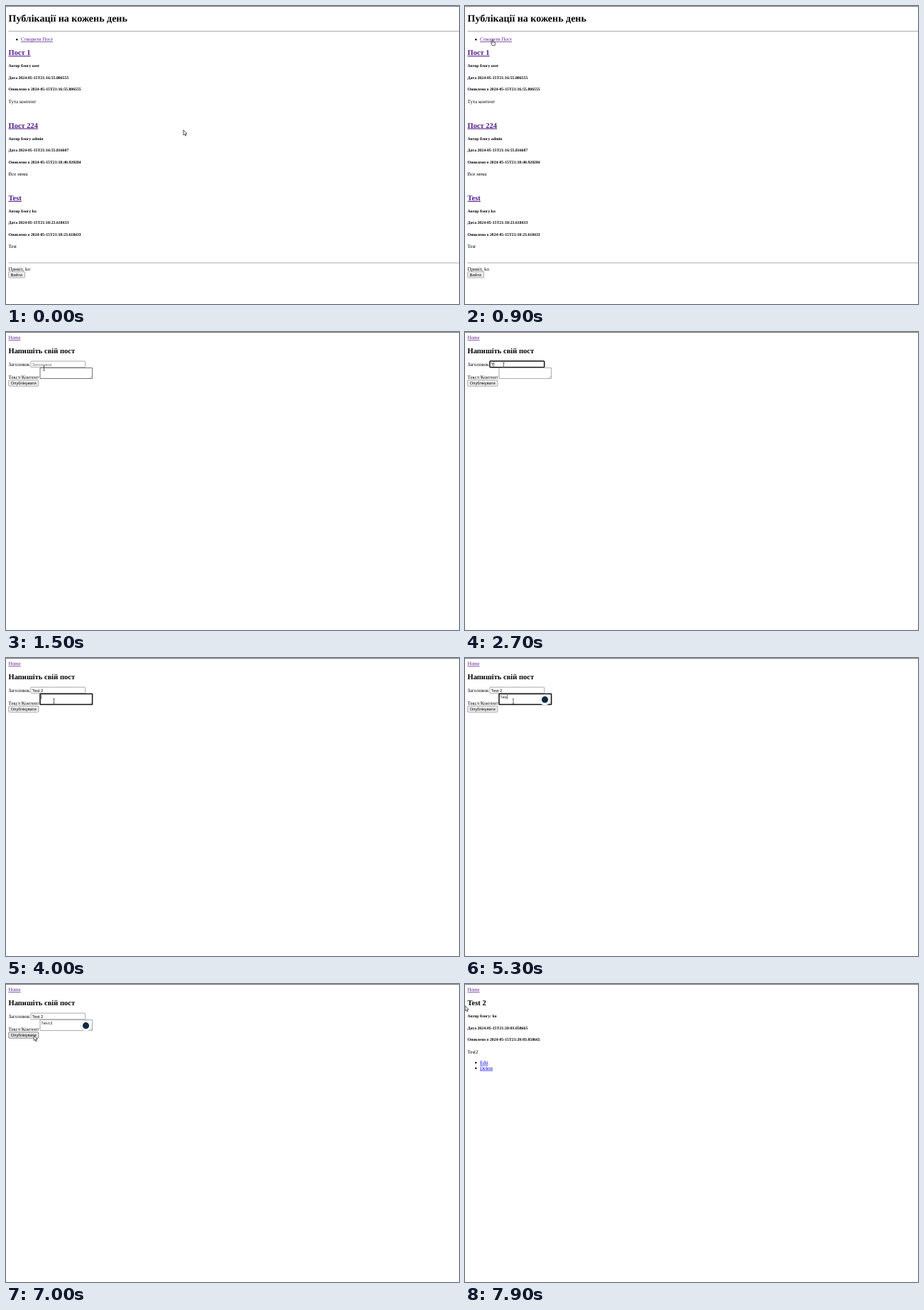
These frames come from a looping animation (638x420 px, 8000 ms). An HTML page:

```html
<!DOCTYPE html>
<html lang="uk">
<head>
<meta charset="utf-8">
<title>Blog</title>
<style>
  html, body { margin: 0; height: 100%; overflow: hidden; background: #fff; }
  svg { display: block; width: 638px; height: 420px; }
  text { font: 7px "Liberation Serif", serif; text-rendering: geometricPrecision; white-space: pre; }
  .h1 { font-size: 14px; font-weight: bold; }
  .h2 { font-size: 10.5px; font-weight: bold; }
  .h5 { font-size: 5.79px; font-weight: bold; }
  .ui { font: 5.83px "Liberation Sans", sans-serif; }
  .mono { font: 5.4px "Liberation Mono", monospace; }
  .link { text-decoration: underline; fill: #0000ee; }
  .visited { fill: #551a8b; }
  .hint { fill: #757575; }
  .box { fill: #fff; stroke: #858585; stroke-width: .7; }
  .box.hover { stroke: #333; }
  .box.focus { stroke: #101010; stroke-width: 1.5; }
  .button { fill: #efefef; stroke: #767676; stroke-width: .6; }
  .button.hover { fill: #e5e5e5; stroke: #4f4f4f; }
  .rule { stroke: #aaa; stroke-width: 1; }
  .caret { stroke: #000; stroke-width: .6; }
  .cursor path { fill: #fff; stroke: #222; stroke-width: .75; stroke-linejoin: round; }
  .cursor .beam { fill: none; stroke: #444; stroke-width: .8; }
</style>
</head>
<body>
<svg id="stage" viewBox="0 0 638 420"></svg>
<script>
const LOOP = 8000, STEP = 100;

const text = (x, y, content, cls = '', id = '') =>
  `<text x="${x}" y="${y}" class="${cls}" id="${id}">${content}</text>`;
const rect = (id, cls, x, y, w, h, r) =>
  `<rect id="${id}" class="${cls}" x="${x}" y="${y}" width="${w}" height="${h}" rx="${r}"/>`;
const rule = y => `<path class="rule" d="M3.5 ${y}H638"/>`;
const item = (y, label, cls) =>
  `<circle cx="15.3" cy="${y - 2}" r="1.2"/>` + text(21, y, label, 'link ' + cls);
const meta = (y, lines) => lines.map((line, i) => text(3.5, y + i * 16.5, line, 'h5')).join('');
const home = text(3.5, 10.2, 'Home', 'link visited');

const post = (y, title, author, created, updated, content) =>
  text(3.5, y, title, 'h2 link visited') +
  meta(y + 17, ['Автор блогу ' + author, 'Дата ' + created, 'Оновлено о ' + updated]) +
  text(3.5, y + 67.4, content);

const listPage =
  text(3.5, 22.2, 'Публікації на кожень день', 'h1') + rule(35.5) +
  item(49.3, 'Створити Пост', 'visited') +
  post(69.1, 'Пост 1', 'user', '2024-05-15T21:16:55.806555', '2024-05-15T21:16:55.806555', 'Тута контент') +
  post(171.5, 'Пост 224', 'admin', '2024-05-15T21:16:55.816607', '2024-05-15T21:18:40.920284', 'Все нема') +
  post(273.9, 'Test', 'ko', '2024-05-15T21:18:23.618433', '2024-05-15T21:18:23.618433', 'Test') +
  rule(362) + text(3.5, 372.5, 'Привіт, ko') +
  rect('logout', 'button', 3.7, 374.3, 22.8, 8.7, 1.2) + text(6.6, 380.8, 'Вийти', 'ui');

const formPage = home +
  text(3.5, 29.7, 'Напишіть свій пост', 'h2') +
  text(3.5, 47.5, 'Заголовок') + rect('title', 'box', 34.9, 41.1, 76.8, 8.7, 1) +
  text(36.8, 47.5, '', 'ui', 'titleText') +
  text(3.5, 65.8, 'Текст/Контент') + rect('body', 'box', 48, 50.6, 73.6, 15, .3) +
  text(49.4, 56.9, '', 'mono', 'bodyText') +
  '<path d="M117.8 65L121 61.8M119.8 65L121 63.8" stroke="#888" stroke-width=".5"/>' +
  '<path id="caret" class="caret"/>' +
  '<g id="badge"><circle cx="112.5" cy="59" r="7.6" fill="#fff" stroke="#ddd" stroke-width=".6"/>' +
  '<circle cx="112.5" cy="58.7" r="4.6" fill="#0f2b46"/></g>' +
  rect('publish', 'button', 3.7, 67.7, 42.2, 8.6, 1.2) + text(6.7, 74.1, 'Опублікувати', 'ui');

const postPage = home +
  text(3.5, 29.8, 'Test 2', 'h2') +
  meta(47, ['Автор блогу: ko', 'Дата 2024-05-15T21:20:03.058665', 'Оновлено о 2024-05-15T21:20:03.058665']) +
  text(3.5, 97.9, 'Test2') + item(112.9, 'Edit', '') + item(120.7, 'Delete', '');

document.getElementById('stage').innerHTML =
  '<path d="M0 .5H638" stroke="#777"/>' +
  [listPage, formPage, postPage].map((page, i) => `<g id="page${i}">${page}</g>`).join('') +
  `<g id="cursor" class="cursor">
    <path id="arrow" d="M0 0V7.1L1.7 5.6L2.8 8.2L4 7.7L2.9 5.2H5Z"/>
    <path id="hand" d="M-.7 5V.6Q0-.5.7.6V3.4L3 4Q3.8 4.3 3.6 5.4L3 8.4H-.6L-2.5 5.4Q-2.2 4.2-.7 5Z"/>
    <path id="beam" class="beam" d="M-1.4-3.3H-.4L0-3L.4-3.3H1.4M0-3V3M-1.4 3.3H-.4L0 3L.4 3.3H1.4"/>
  </g>`;

const $ = id => document.getElementById(id);
const show = (id, on) => { $(id).style.display = on ? '' : 'none'; };

// Pointer keys: time, x, y
const path = [
  [200, 249.8, 174.8], [800, 39, 47.3], [1100, 39, 47.3], [1500, 53.5, 51], [1900, 54.5, 46.3],
  [3300, 54.5, 46.3], [3400, 55, 47], [3500, 55, 47], [3700, 66, 59], [3800, 66, 59], [4100, 68, 61],
  [5700, 68, 61], [6200, 39.3, 72.7], [7100, 39.3, 72.7], [7500, 33, 81], [7700, 33, 81], [7900, .2, 30.7]
];
const titleKeys = [[2700, 'T'], [3000, 'Te'], [3200, 'Tes'], [3400, 'Test'], [3600, 'Test 2']];
const bodyKeys = [[4500, 'T'], [4900, 'Te'], [5200, 'Tes'], [5400, 'Test'], [5500, 'Test2']];

const typed = (keys, t) => keys.reduce((value, [at, next]) => t >= at ? next : value, '');
const inside = (x, y, left, top, right, bottom) => x >= left && x <= right && y >= top && y <= bottom;

function pointer(t) {
  const next = path.findIndex(key => key[0] > t);
  if (next === 0) return path[0].slice(1);
  if (next < 0) return path.at(-1).slice(1);
  const [t0, x0, y0] = path[next - 1], [t1, x1, y1] = path[next];
  const p = (t - t0) / (t1 - t0), eased = p * p * (3 - 2 * p);
  return [x0 + (x1 - x0) * eased, y0 + (y1 - y0) * eased];
}

function draw(t) {
  const page = t < 1000 ? 0 : t < 7200 ? 1 : 2;
  for (let i = 0; i < 3; i++) show('page' + i, i === page);

  const [x, y] = pointer(t);
  const onTitle = page === 1 && inside(x, y, 35, 41, 112, 50);
  const onBody = page === 1 && !onTitle && inside(x, y, 48, 50, 122, 66);
  const onButton = page === 1 && inside(x, y, 3, 67, 46, 77);
  const onLink = page === 0 && inside(x, y, 21, 43, 66, 52);
  $('cursor').setAttribute('transform', `translate(${x} ${y})`);
  show('hand', onLink);
  show('beam', onTitle || onBody);
  show('arrow', !onLink && !onTitle && !onBody);

  const inTitle = t >= 1800 && t < 4000, inBody = t >= 4000 && t < 6300;
  $('title').setAttribute('class', 'box' + (inTitle ? ' focus' : onTitle ? ' hover' : ''));
  $('body').setAttribute('class', 'box' + (inBody ? ' focus' : onBody ? ' hover' : ''));
  $('publish').setAttribute('class', 'button' + (onButton ? ' hover' : ''));

  const title = typed(titleKeys, t), body = typed(bodyKeys, t);
  $('titleText').textContent = title || 'Заголовок';
  $('titleText').setAttribute('class', title ? 'ui' : 'ui hint');
  $('bodyText').textContent = body;
  show('badge', t >= 4500);

  show('caret', inTitle || inBody);
  if (page === 1) {
    const titleWidth = title ? $('titleText').getComputedTextLength() : 0;
    const bodyWidth = body ? $('bodyText').getComputedTextLength() : 0;
    $('caret').setAttribute('d', inTitle ? `M${37.1 + titleWidth} 42.3v6.4` : `M${49.7 + bodyWidth} 52v6`);
  }
}

const start = performance.now();
function frame() {
  const t = (performance.now() - start) % LOOP;
  draw(Math.floor(t / STEP) * STEP);
  requestAnimationFrame(frame);
}
frame();
</script>
</body>
</html>
```
